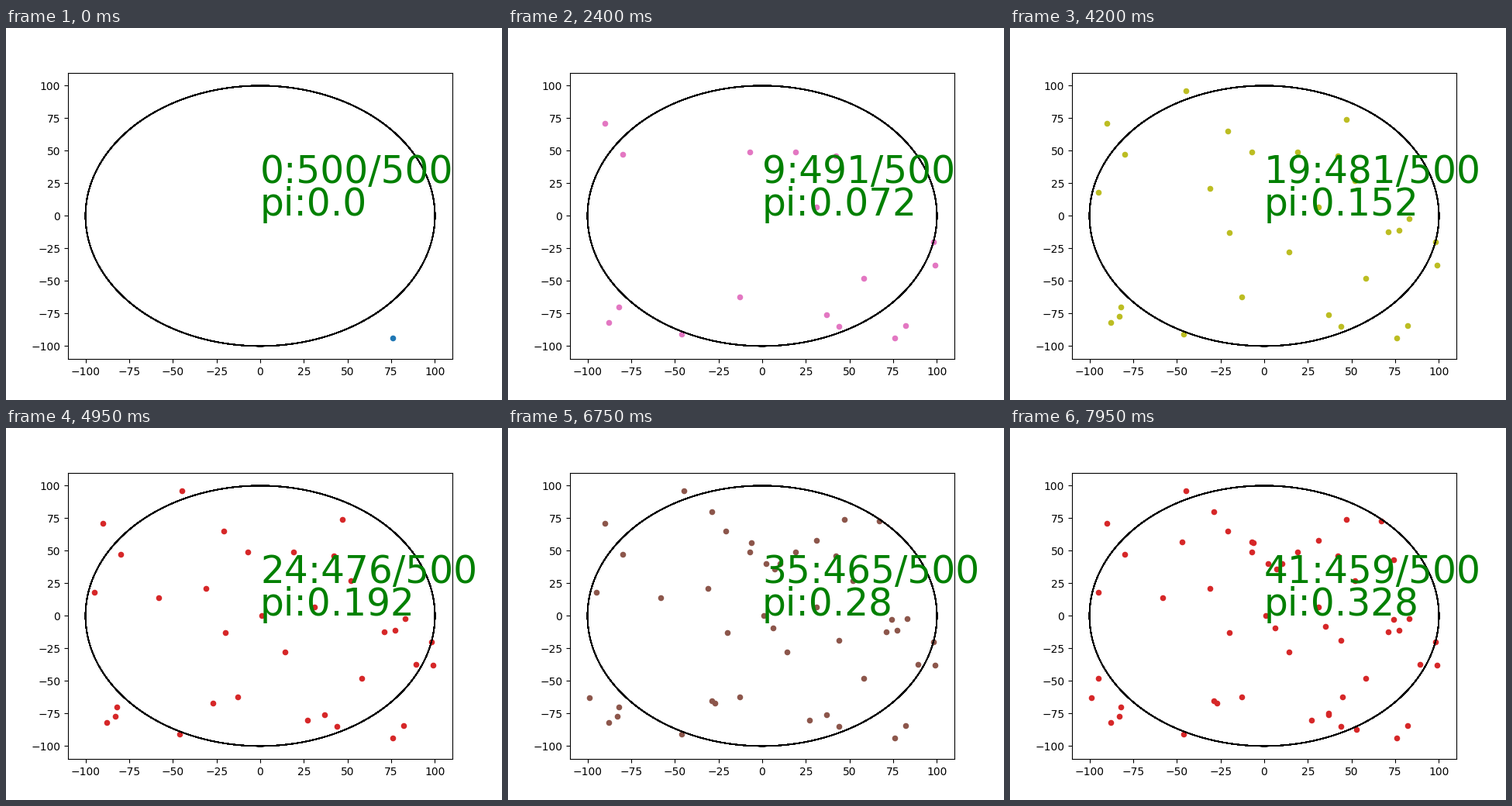
These frames come from a looping animation (640x480 px, 8000 ms). A matplotlib script:

```python
import random
import numpy as np
import matplotlib.pyplot as plt
from matplotlib.animation import FuncAnimation

TOTAL = 500
RADIUS = 100
TICK = 50          # ms per animation frame
HOLD = 3           # animation frames per sample
LOOP = 8000
FRAMES = LOOP // TICK
STEPS = -(-FRAMES // HOLD)
FIRST = (76, -94)

random.seed(7)

# Pace of the hit counter: (sample index, hits so far).
PACE = [(0, 0), (8, 4), (16, 9), (22, 14), (33, 24), (45, 35), (53, 41)]
hit_count = np.rint(np.interp(range(STEPS), *zip(*PACE))).astype(int)


def throw(hit):
    """Random integer point that lands inside or outside the circle."""
    while True:
        x, y = (random.randint(-RADIUS, RADIUS) for _ in "xy")
        if (x * x + y * y <= RADIUS ** 2) == hit:
            return x, y


samples = [FIRST] + [throw(bool(gain)) for gain in np.diff(hit_count)]

plt.rcParams["font.family"] = "DejaVu Sans"
plt.rcParams["text.kerning_factor"] = 6
fig, ax = plt.subplots(figsize=(6.4, 4.8), dpi=100)

# Many turns over the same outline give its hard edge.
theta = np.arange(0, 100, 0.01)
ax.plot(RADIUS * np.cos(theta), RADIUS * np.sin(theta), color="black", lw=1)
ax.set(xlim=(-110, 110), ylim=(-110, 110))

dots = ax.scatter([], [], s=20)
label_style = dict(fontsize=35, color="green")
count_label = ax.text(0, 25, "", **label_style)
pi_label = ax.text(0, 0, "", **label_style)


def update(frame):
    step = frame // HOLD
    hits = int(hit_count[step])
    dots.set_offsets(samples[:step + 1])
    dots.set_color(f"C{step % 10}")
    count_label.set_text(f"{hits}:{TOTAL - hits}/{TOTAL}")
    pi_label.set_text(f"pi:{4 * hits / TOTAL}")
    return dots, count_label, pi_label


anim = FuncAnimation(fig, update, frames=FRAMES, interval=TICK,
                     repeat=True, repeat_delay=0)
plt.show()
```
